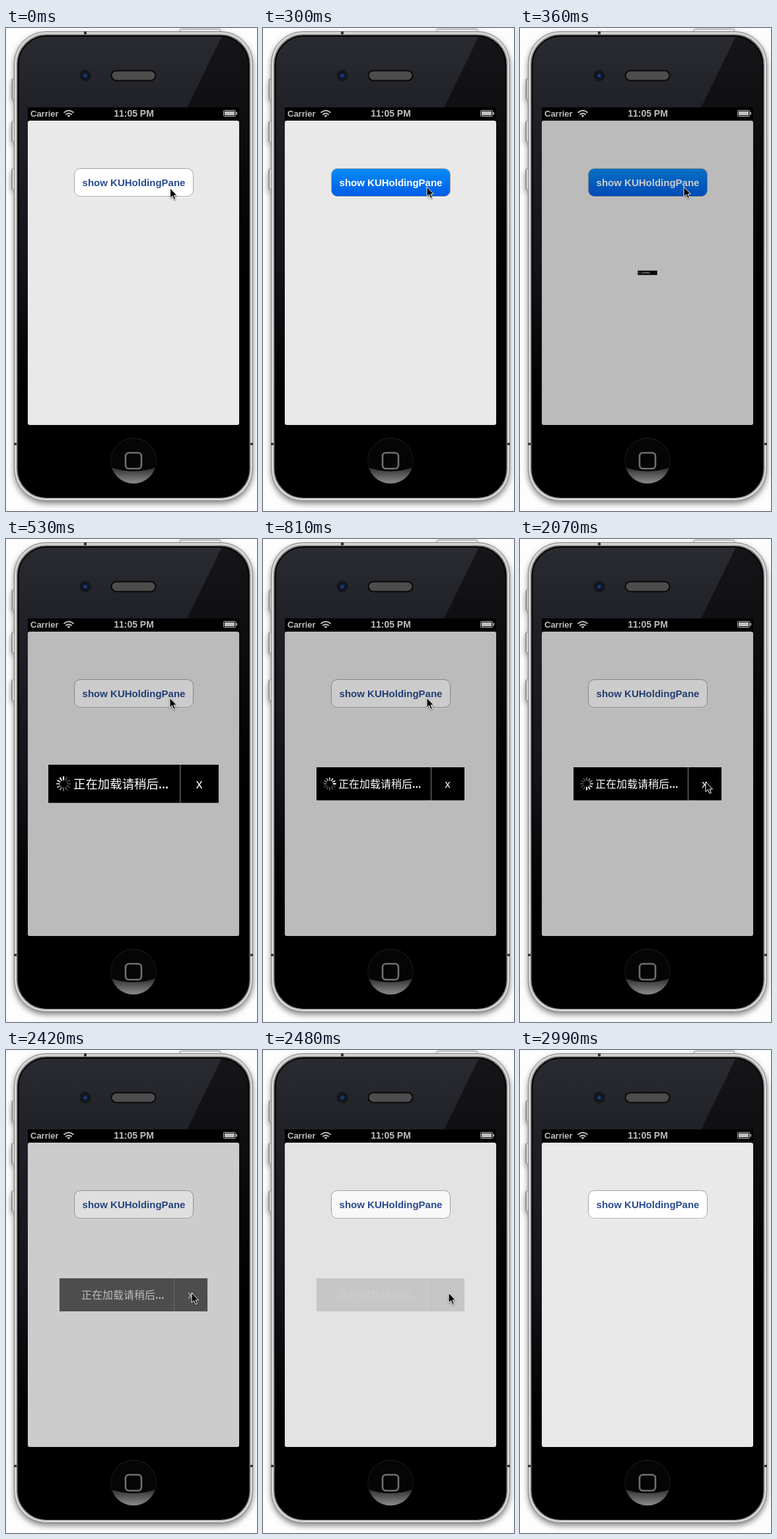
Animation of 380x730 px, one loop 3.76 s. Source, as an HTML page:

```html
<!DOCTYPE html>
<html lang="zh-CN">
<head>
<meta charset="utf-8">
<style>
  html, body { margin: 0; width: 100%; height: 100%; overflow: hidden; background: #fdfdfd; }
  svg { display: block; width: 380px; height: 730px; font-family: "Liberation Sans", "Noto Sans CJK SC", "Noto Sans CJK", sans-serif; font-kerning: none; }
  .bold { font-weight: bold; }
  .mid { text-anchor: middle; }
  #shell { filter: drop-shadow(0 4px 4px #0007); }
  #cursor { filter: drop-shadow(0 1px 1px #0007); }
  #panel > * { opacity: var(--fade); }
</style>
</head>
<body>
<svg viewBox="0 0 380 730">
  <defs>
    <linearGradient id="face" x2="0" y2="1">
      <stop stop-color="#2a2b31"/><stop offset=".17" stop-color="#202127"/>
      <stop offset=".5" stop-color="#121419"/><stop offset=".78"/>
    </linearGradient>
    <linearGradient id="shade" x2="0" y2="1">
      <stop stop-opacity=".5"/><stop offset=".2" stop-opacity=".55"/><stop offset=".55" stop-opacity="1"/>
    </linearGradient>
    <linearGradient id="side">
      <stop stop-color="#777"/><stop offset=".5" stop-color="#eee"/><stop offset="1" stop-color="#999"/>
    </linearGradient>
    <linearGradient id="blue" x2="0" y2="1">
      <stop stop-color="#058cf5"/><stop offset="1" stop-color="#015de6"/>
    </linearGradient>
    <linearGradient id="glow" x2="0" y2="1">
      <stop stop-color="#2a2a2a"/><stop offset="1" stop-color="#999"/>
    </linearGradient>
    <linearGradient id="ring" x2="0" y2="1">
      <stop stop-color="#222"/><stop offset="1" stop-color="#0a0a0a"/>
    </linearGradient>
    <radialGradient id="lens">
      <stop stop-color="#2f5c9c"/><stop offset=".4" stop-color="#152c5a"/><stop offset="1" stop-color="#0c101c"/>
    </radialGradient>
    <pattern id="mesh" width="3" height="3" patternUnits="userSpaceOnUse">
      <path fill="#777" d="M0 0h3v3H0z"/><path fill="#222" d="M0 0h1.500v1.500H0zM1.500 1.500H3V3H1.500z"/>
    </pattern>
    <clipPath id="faceClip"><rect x="18" y="12" width="350" height="697" rx="43"/></clipPath>
    <clipPath id="homeClip"><circle cx="193" cy="654.500" r="34.500"/></clipPath>
  </defs>

  <g id="shell">
    <g fill="url(#side)" stroke="#888" stroke-width=".8">
      <rect x="9" y="77" width="6" height="31" rx="1"/>
      <rect x="8.500" y="141" width="6" height="31" rx="2"/>
      <rect x="8.500" y="213" width="6" height="31" rx="2"/>
      <rect x="263.500" y="1.500" width="61" height="6" rx="1" fill="#e4e4e4"/>
    </g>
    <rect x="12.500" y="5.500" width="361" height="709" rx="48" fill="#d6d6d6" stroke="#808080"/>
  </g>
  <path d="M118 5h4v7h-4zM12 627h6v3.500h-6zM368 627h6v3.500h-6z" fill="#333"/>
  <rect x="17" y="10.500" width="352" height="699.500" rx="44" fill="none" stroke="#7a7a7a" stroke-width="2"/>
  <g clip-path="url(#faceClip)">
    <rect x="18" y="12" width="350" height="697" fill="url(#face)"/>
    <path d="M327 12H368V709H193V286z" fill="url(#shade)"/>
  </g>
  <rect x="18.500" y="12" width="349" height="697" rx="43" fill="none" stroke="#000" stroke-width="2"/>

  <circle cx="120" cy="72" r="8.500" fill="#15161b" stroke="#1b1c21"/>
  <circle cx="120" cy="72" r="5" fill="url(#lens)"/>
  <rect x="159.500" y="64.500" width="67" height="15" rx="7.500" fill="url(#mesh)" stroke="#08080a" stroke-width="2"/>

  <g clip-path="url(#homeClip)">
    <circle cx="193" cy="654.500" r="35" fill="#050505"/>
    <path d="M156 663Q193 677 230 663V692H156z" fill="url(#glow)"/>
  </g>
  <circle cx="193" cy="654.500" r="34.500" fill="none" stroke="url(#ring)"/>
  <rect x="181" y="642" width="24" height="24" rx="5" fill="none" stroke="#707070" stroke-width="2.600"/>

  <rect x="33" y="120" width="320" height="480"/>
  <g class="bold" fill="#bfbfbf">
    <text x="37" y="134" font-size="13">Carrier</text>
    <text class="mid" x="193.500" y="134" font-size="14">11:05 PM</text>
  </g>
  <g fill="none" stroke="#bfbfbf" stroke-width="2">
    <path d="M87.500 128Q95 121.500 102.500 128M90.300 131Q95 127 99.700 131"/>
    <path d="M92.500 132.500Q95 130.500 97.500 132.500L95 135z" fill="#bfbfbf" stroke="none"/>
    <rect x="329.500" y="124.500" width="18" height="9" rx="1" stroke-width="1"/>
    <path d="M331 126h15v6h-15zM348.500 127h1.500v4h-1.500z" fill="#bfbfbf" stroke="none"/>
  </g>

  <rect x="33" y="140" width="320" height="460" rx="3" fill="#e9e9e9"/>
  <rect x="103.500" y="213.500" width="180" height="42" rx="9" fill="none" stroke="#fff"/>
  <rect id="button" x="103.500" y="212.500" width="180" height="42" rx="9" stroke="#a3a3a3"/>
  <text id="label" class="bold mid" x="193.500" y="239" font-size="15">show KUHoldingPane</text>
  <rect id="dim" x="33" y="140" width="320" height="460" rx="3"/>

  <g id="panel">
    <rect x="-112" y="-25" width="224" height="50"/>
    <path d="M61.500-25V25" stroke="#808080"/>
    <g id="spinner" stroke="#fff" stroke-width="1.900" stroke-linecap="round"></g>
    <text x="-79" y="6" font-size="16" fill="#fff">正在加载请稍后<tspan class="bold">...</tspan></text>
    <text class="mid" x="86.500" y="6" font-size="17" fill="#fff">x</text>
  </g>

  <path id="cursor" d="M0 0V15L3.500 11.800 6 17.500 8.500 16.400 6 11H10.500z" stroke="#fff"/>
</svg>
<script>
const LOOP = 3760, TICK = 57.5, SPOKES = 12;
const $ = id => document.getElementById(id);
const clamp = v => Math.min(1, Math.max(0, v));
const ease = p => p * p * (3 - 2 * p);

// [tick, x, y] of the pointer tip
const route = [
  [0, 248.5, 242], [1, 248, 241], [2, 248, 240], [24, 248, 240], [25, 255, 245],
  [26, 262, 262], [27, 270, 283], [29, 277, 330], [31, 281, 363], [32, 281, 367],
  [45, 281, 367], [46, 282, 372], [48, 305, 440], [50, 331, 550], [51, 341, 640], [52, 341, 750]
];

function track(points, at) {
  const i = points.findIndex(p => p[0] > at);
  if (i < 0) return points.at(-1).slice(1);
  const [a, b] = [points[i - 1], points[i]];
  const f = (at - a[0]) / (b[0] - a[0]);
  return a.slice(1).map((v, n) => v + (b[n + 1] - v) * f);
}

// Pop in: overshoot, undershoot, settle
const popScale = time =>
  track([[0, .1], [1, 1.2], [2, .9], [3, 1]], 3 * ease(clamp((time - 318) / 470)))[0];

for (let i = 0; i < SPOKES; i++) {
  const spoke = document.createElementNS("http://www.w3.org/2000/svg", "path");
  spoke.setAttribute("d", "M0-5.500V-9");
  spoke.setAttribute("transform", `translate(-92) rotate(${i * 360 / SPOKES})`);
  $("spinner").append(spoke);
}

function draw(now) {
  const tick = Math.floor(now % LOOP / TICK), time = tick * TICK;
  const pressed = tick >= 5 && tick <= 7;
  $("button").setAttribute("fill", pressed ? "url(#blue)" : "#fff");
  $("label").setAttribute("fill", pressed ? "#fff" : "#2b4c90");

  const fade = tick < 6 ? 0 : 1 - ease(clamp((time - 2347) / 162));
  $("dim").setAttribute("opacity", .2 * fade);
  $("panel").style.setProperty("--fade", fade);
  $("panel").setAttribute("transform", `translate(193 370) scale(${popScale(time)})`);

  const head = Math.floor(time * SPOKES / 1000) + 6;
  $("spinner").setAttribute("visibility", tick < 41 ? "visible" : "hidden");
  [...$("spinner").children].forEach((spoke, i) => {
    const age = (head - i + SPOKES) % SPOKES;
    spoke.setAttribute("opacity", Math.max(.28, 1 - age * .1));
  });

  $("cursor").setAttribute("transform", `translate(${track(route, tick)})`);
  requestAnimationFrame(draw);
}
requestAnimationFrame(draw);
</script>
</body>
</html>
```
